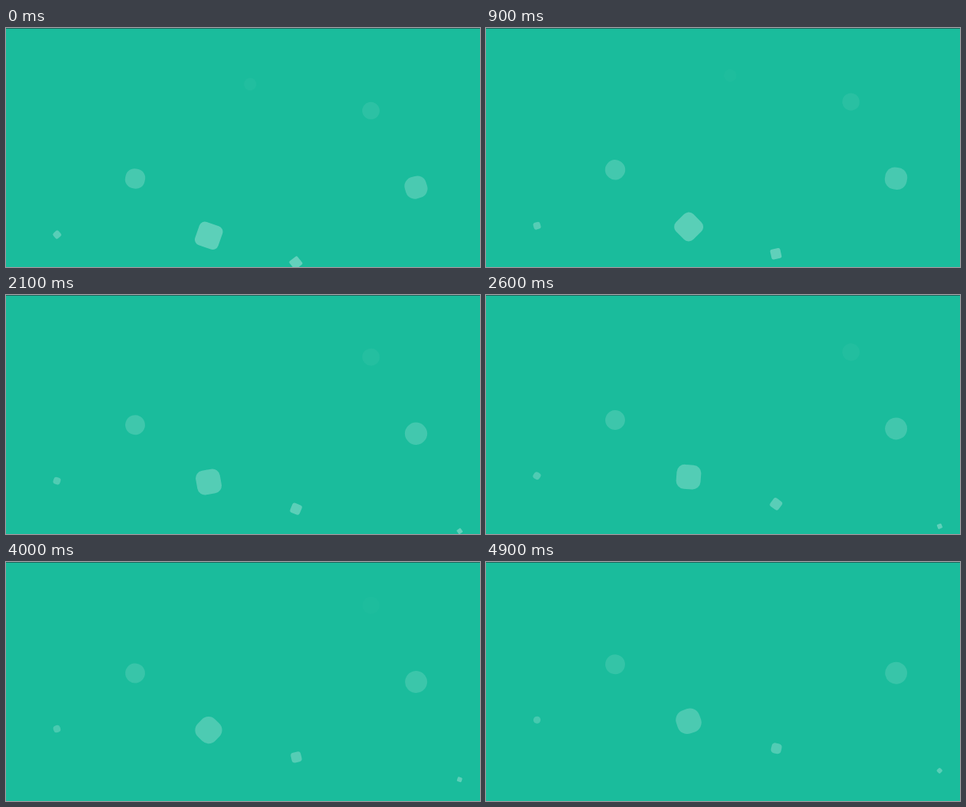
An HTML page that plays this animation: 600x303 px, repeating every 5000 ms.

```html
<!DOCTYPE html>
<html lang="en">
<head>
<meta charset="utf-8">
<title>Rising squares</title>
<style>
  /* seconds since a square left its starting place below the stage */
  @property --age {
    syntax: "<number>";
    inherits: false;
    initial-value: 0;
  }
  html, body {
    margin: 0;
    width: 100%;
    height: 100%;
    overflow: hidden;
    background: #1abc9c;
  }
  .stage {
    position: relative;
    width: 600px;
    height: 303px;
    overflow: hidden;
  }
  .stage::before {
    content: "";
    position: absolute;
    inset: 0 0 auto;
    height: 1px;
    background: #22645c;
  }
  /* --n: size in units of 3.125px, --x: centre, --start: age when the loop begins */
  i {
    --size: calc(var(--n) * 3.125px);
    position: absolute;
    left: calc(var(--x) * 1px - var(--size) / 2);
    top: calc(365.3px - var(--size));
    width: var(--size);
    height: var(--size);
    background: #fff;
    opacity: calc(.4 * (1 - var(--age) / 25));
    border-radius: calc(var(--age) * 3.44%);
    transform: translateY(calc(var(--age) * -12.5px)) rotate(calc(var(--age) * 28.8deg));
    animation: rise 5s steps(50) infinite;
  }
  @keyframes rise {
    from { --age: var(--start); }
    to { --age: calc(var(--start) + 5); }
  }
</style>
</head>
<body>
<div class="stage">
  <i style="--n:5; --x:308.5; --start:22.92"></i>
  <i style="--n:7; --x:462; --start:19.92"></i>
  <i style="--n:8; --x:163; --start:12.92"></i>
  <i style="--n:9; --x:519.3; --start:11.92"></i>
  <i style="--n:3; --x:64.8; --start:7.92"></i>
  <i style="--n:10; --x:256.3; --start:6.92"></i>
  <i style="--n:4; --x:367.2; --start:4.92"></i>
  <i style="--n:2; --x:574.5; --start:2.92"></i>
</div>
</body>
</html>
```
